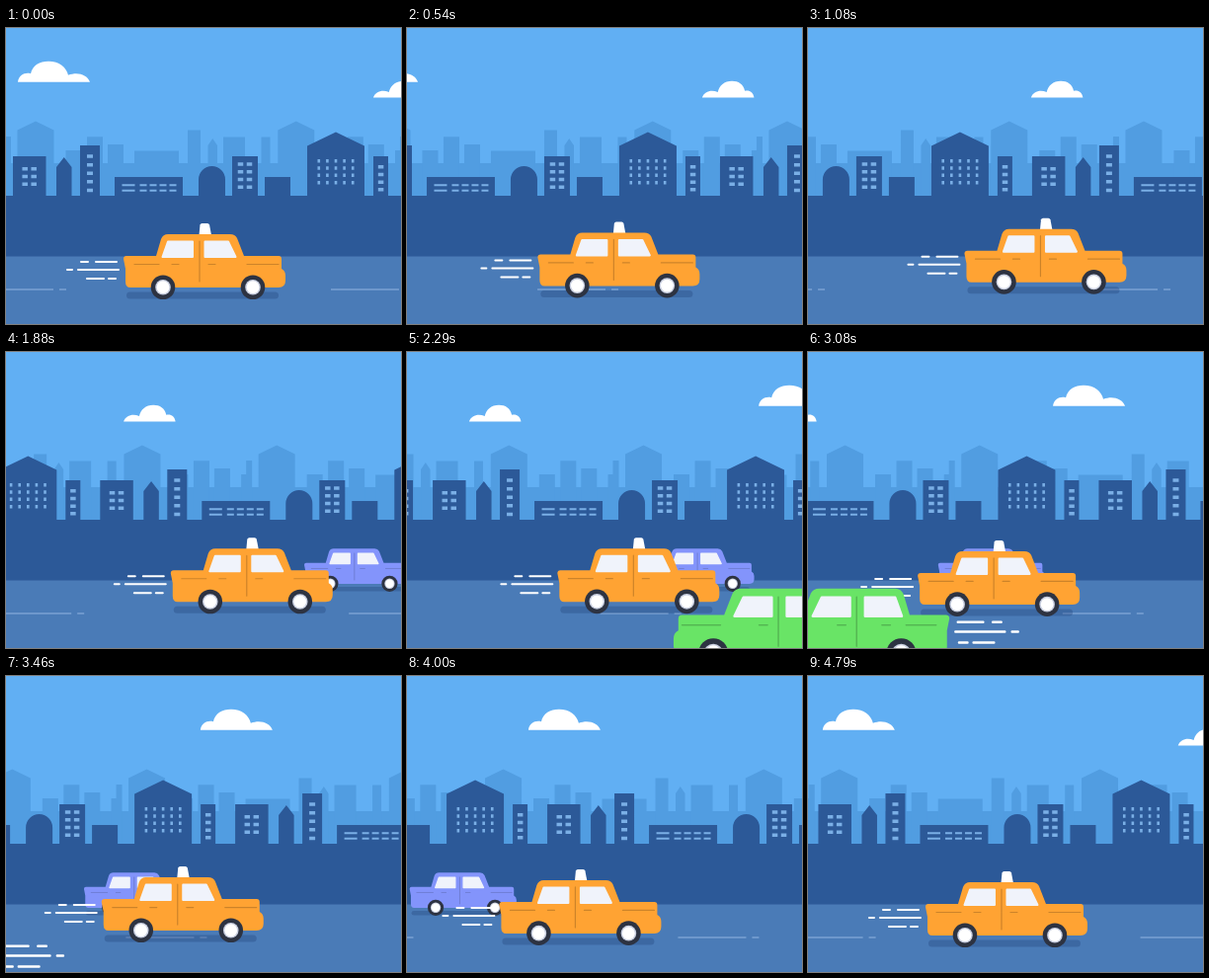
An HTML page for the animation above (4.83 s loop, 400x300 px).

```html
<!DOCTYPE html>
<html lang="en">
<head>
<meta charset="utf-8">
<title>City taxi</title>
<style>
html, body { margin: 0; width: 100%; height: 100%; overflow: hidden; background: #61aff3; }
svg { display: block; width: 100vw; height: 100vh; }
</style>
</head>
<body>
<svg viewBox="0 0 400 300" preserveAspectRatio="none">
  <defs>
    <path id="cloud" fill="#fff" d="M0 21C1 14 7 11 13 12.5C15 4 22 0 31 0C42 0 49 6 51 14C60 10.5 70 13 73 21Z"/>
    <g id="backTown"></g>
    <g id="frontTown"></g>
    <path id="dash" d="M0 265h69m6 0h7" stroke="#7ba2d4" stroke-width="1.5"/>
    <g id="wheel">
      <circle r="12.3" fill="#2d3342"/>
      <circle r="7.8" fill="#c9cfe0"/>
      <circle r="6.4" fill="#fff"/>
    </g>
    <!-- origin: rear bumper, wheel axle height -->
    <g id="car">
      <rect x="3" y="5.5" width="154" height="7" rx="3.5" fill="#1f3f78" opacity=".32"/>
      <path fill="currentColor" d="M0-28Q0-31 3-31H33L38-48Q40-53 45-53H108Q113-53 115-49L122-31H157Q160-31 160-28V-18Q164-16 164-11V-6Q164 1 157 1H7Q2 1 2-5V-18Z"/>
      <g fill="#f0f3fb" stroke="#f0f3fb" stroke-width="2" stroke-linejoin="round">
        <path d="M45-45.5H70V-30H39.5Z"/>
        <path d="M82.5-45.5H106L113.5-30H82.5Z"/>
      </g>
      <path d="M77-46V-5M11-22.5H36M49-22.5H56M86-22.5H93M125-22.5H157" fill="none" stroke="#000" stroke-opacity=".2" stroke-width="1.2" stroke-linecap="round"/>
      <use href="#wheel" x="40" y=".7"/>
      <use href="#wheel" x="131" y=".7"/>
    </g>
    <path id="wind" d="M-43-25h7M-28-25h21M-57-17h5M-46-17h41M-37-8h17M-15-8h7" fill="none" stroke="#fff" stroke-width="2" stroke-linecap="round"/>
  </defs>

  <rect width="400" height="300" fill="#61aff3"/>
  <g id="cloudA"><use href="#cloud"/></g>
  <g id="cloudB"><use href="#cloud" transform="translate(52.5 0) scale(-.72 .8)"/></g>
  <rect y="137" width="400" height="40" fill="#519de1"/>
  <g id="back"><use href="#backTown"/><use href="#backTown" x="400"/></g>
  <rect y="170" width="400" height="62" fill="#2c5998"/>
  <g id="front"><use href="#frontTown"/><use href="#frontTown" x="400"/></g>
  <rect y="231.5" width="400" height="68.5" fill="#4a7bb7"/>
  <g id="road"><use href="#dash" x="-350"/><use href="#dash"/><use href="#dash" x="350"/></g>
  <g id="purple" color="#8394fb"><use href="#car" transform="scale(.66)"/></g>
  <g id="taxi" color="#ffa333">
    <use href="#wind"/>
    <path d="M76.500-52L77.500-62.500Q78-64 79.500-64H85Q86.500-64 87-62.500L89-52Z" fill="#fff"/>
    <use href="#car"/>
  </g>
  <g id="green" color="#69e466"><g transform="translate(200 0) scale(-1.22 1.22)"><use href="#wind"/><use href="#car"/></g></g>
</svg>
<script>
const $ = id => document.getElementById(id);
const LOOP = 4830, FPS = 24, FRAMES = 115.5;

const block = (x, top, w, base = 171) => `M${x} ${top}h${w}V${base}h${-w}Z`;
const gable = (x, apex, eave, w, base = 171) =>
  `M${x} ${eave}l${w / 2} ${apex - eave}l${w / 2} ${eave - apex}V${base}h${-w}Z`;
const shape = (d, fill) => `<path d="${d}" fill="${fill}"/>`;

// window grid centred on a middle line
function panes(mid, top, cols, rows, w = 5.5, pitch = 9, step = 7.7, h = 3.5) {
  const left = mid - ((cols - 1) * pitch + w) / 2;
  let d = '';
  for (let c = 0; c < cols; c++)
    for (let r = 0; r < rows; r++) {
      const y = top + r * step;
      d += block(left + c * pitch, y, w, y + h);
    }
  return d;
}

// a house with three neighbours, seen twice in the far row
const group = x => gable(x, 94.5, 103.5, 37, 138) + block(x + 49, 124, 16) +
  block(x + 70.5, 110.3, 16) + block(x + 91.5, 118, 16);
$('backTown').innerHTML = shape(
  group(11.5) + group(275.3) + block(-6, 124, 6) + block(-1, 110, 6) +
  block(130, 124.5, 45) + block(184, 103.5, 13) + gable(204.5, 112, 119, 9.5) +
  block(220, 110.5, 22) + block(258.5, 110.5, 9), '#519de1');

$('frontTown').innerHTML = shape(
  block(7, 130, 33.5) + gable(51, 131, 141, 15.5) + block(75, 119, 20) +
  block(110, 151, 69) + 'M195 171V153.5a13.5 13.5 0 0 1 27 0V171Z' +
  block(229, 130, 26) + block(262, 151, 26) + gable(305, 105.5, 119.5, 58) +
  block(372, 130, 15), '#2c5998') +
  shape(
    panes(23.7, 141, 2, 3) + panes(85, 128.3, 1, 5, 6, 0, 8.6) +
    panes(124, 158.3, 1, 2, 13, 0, 5.5, 2) + panes(154, 158.3, 4, 2, 7, 10, 5.5, 2) +
    panes(242, 136.3, 2, 4) + panes(334, 133, 5, 4, 2.6, 8.6, 7.3) +
    panes(379.6, 139, 1, 4), '#7aafe6');

const mod = (a, b) => ((a % b) + b) % b;
const move = (id, x, y = 0) => $(id).setAttribute('transform', `translate(${x.toFixed(2)} ${y.toFixed(2)})`);

// cosine easing through [time, value] keys
function ease(keys, t) {
  const i = Math.max(1, keys.findIndex(k => k[0] >= t));
  const [t0, a] = keys[i - 1], [t1, b] = keys[i];
  return a + (b - a) * (1 - Math.cos(Math.PI * (t - t0) / (t1 - t0))) / 2;
}
const taxiX = [[0, 0], [38, 51], [92, -27.5], [FRAMES, 0]];
const taxiY = [[0, 0], [50, -10], [FRAMES, 0]];

function draw(ms) {
  const n = Math.floor((ms + 5) * FPS / 1000) % 116;
  const p = n / FRAMES;
  move('cloudA', mod(112 - 657 * p, 657) - 100, 33.7);
  move('cloudB', mod(472 - 649 * p, 649) - 100, 53.8);
  move('back', -400 * p);
  move('front', -mod(800 * p, 400));
  move('road', mod(-21 - 1750 * p, 350));
  move('purple', 302 - 5.87 * (n - 45), 234.3);
  move('taxi', 119 + ease(taxiX, n), 262 + ease(taxiY, n));
  move('green', 98 - 17.2 * (n - 65), 304.3);
}

const start = performance.now();
function tick() {
  draw((performance.now() - start) % LOOP);
  requestAnimationFrame(tick);
}
tick();
</script>
</body>
</html>
```
